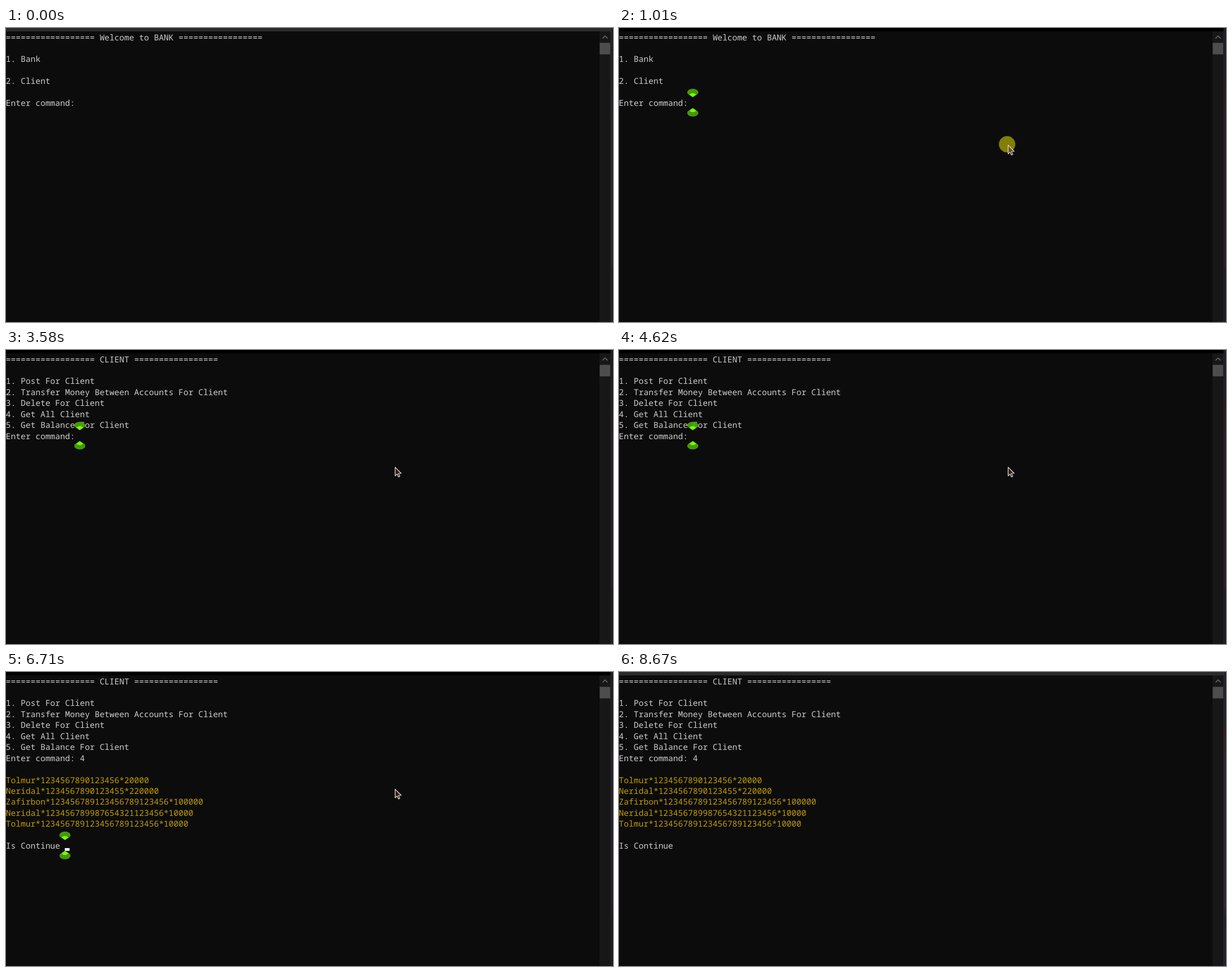
An HTML page for the animation above (8880 ms loop, 1074 by 521 pixels).

```html
<!DOCTYPE html>
<html lang="en">
<head>
<meta charset="utf-8">
<title>Console menu</title>
<style>
  html, body { margin: 0; width: 100%; height: 100%; overflow: hidden; background: #0c0c0c; }
  svg { display: block; width: 1074px; height: 521px; }
  text {
    font: 14.56px "Noto Sans Mono", "DejaVu Sans Mono", monospace;
    fill: #cccccc;
    white-space: pre;
    text-rendering: geometricPrecision;
  }
  text.gold { fill: #c19c00; }
</style>
</head>
<body>
<svg viewBox="0 0 1074 521">
  <defs>
    <linearGradient id="edge" x1="0" y1="0" x2="0" y2="1">
      <stop offset="0" stop-color="#1d1d26"/>
      <stop offset=".17" stop-color="#1d1d26"/>
      <stop offset=".2" stop-color="#2b191c"/>
      <stop offset=".3" stop-color="#301c2f"/>
      <stop offset=".8" stop-color="#301c2f"/>
      <stop offset=".83" stop-color="#1c1a25"/>
      <stop offset="1" stop-color="#21192a"/>
    </linearGradient>
    <g id="fan">
      <path fill="#4ca50a" opacity=".92" d="M0 0L-8.3-5.3Q-9.8-6.5-9.8-8.4C-9.6-12.5-5-14.8 0-14.8S9.6-12.5 9.8-8.4Q9.8-6.5 8.3-5.3Z"/>
      <path fill="#76f90a" d="M0 0L-6.3-4.5Q0-10 6.3-4.5Z"/>
    </g>
  </defs>

  <rect width="1074" height="521" fill="#0c0c0c"/>
  <rect x="1050" y="6" width="20" height="515" fill="#171717"/>
  <rect x="1050.5" y="26.3" width="18.5" height="20.4" fill="#4d4d4d"/>
  <path d="M1055.5 18.5L1060 14L1064.5 18.5" fill="none" stroke="#6c6c6c" stroke-width="1.5"/>
  <g id="side">
    <rect x="1071" width="3" height="521" fill="url(#edge)"/>
    <rect x="1070" width="1" height="521" fill="#38383c"/>
  </g>
  <rect id="bar" width="1070" height="6"/>

  <g id="lines"></g>
  <rect id="caret" width="8.5" height="5" fill="#f2f2f2"/>
  <g id="marks">
    <use href="#fan"/>
    <use href="#fan" transform="translate(0 19.4) scale(1 -1)"/>
  </g>
  <circle id="halo" cx="686.7" cy="206" r="14.5" fill="#807f06"/>
  <path id="pointer" d="M.5.6V16L4 12.8L6.4 18.1L8.8 17.1L6.5 11.8L11.2 11.5Z"
        fill="#5a3426" fill-opacity=".55" stroke="#f0e8e2" stroke-width="1.1" stroke-linejoin="round"/>
</svg>

<script>
const LOOP = 8880, CELL = 8.736, ROW = 19.45, LEFT = -0.2, TOP = 5.9, BASE = 15.6;
const $ = id => document.getElementById(id);
const colX = c => LEFT + c * CELL;
const rowY = r => TOP + r * ROW;
const head = s => `${"=".repeat(18)} ${s} ${"=".repeat(17)}`;

const menu = [head("Welcome to BANK"), "", "1. Bank", "", "2. Client", "", "Enter command: "];
const client = [
  head("CLIENT"), "",
  "1. Post For Client",
  "2. Transfer Money Between Accounts For Client",
  "3. Delete For Client",
  "4. Get All Client",
  "5. Get Balance For Client",
  "Enter command: "
];
const accounts = [
  "Tolmur*1234567890123456*20000",
  "Neridal*1234567890123455*220000",
  "Zafirbon*123456789123456789123456*100000",
  "Neridal*123456789987654321123456*10000",
  "Tolmur*123456789123456789123456*10000"
];
const type = (lines, key) => [...lines.slice(0, -1), lines[lines.length - 1] + key];
const clientDone = type(client, "4");

// Each track is a list of [start ms, value].
const screens = [
  [0, menu], [2050, type(menu, "2")], [2780, []], [2820, client],
  [5840, clientDone], [6690, [...clientDone, "", ...accounts, "", "Is Continue "]]
];
const carets = [
  [0, null], [1530, [15, 6]], [2050, null], [2560, [16, 6]], [2760, [0, 7]],
  [2820, [15, 7]], [3580, null], [4100, [15, 7]], [4620, null], [5140, [15, 7]],
  [5660, null], [6170, [16, 7]], [6690, [12, 15]], [7750, null],
  [8270, [12, 15]], [8670, null]
];
const markers = [
  [0, null], [1010, [15, 6]], [2050, [16, 6]], [2850, [15, 7]],
  [5860, [16, 7]], [6710, [12, 15]], [8670, null]
];
const at = (track, t) => track.filter(s => s[0] <= t).pop()[1];

function pointerAt(t) {
  if (t < 370 || t >= 7810) return null;
  if (t < 7690) {
    const rest = 1 - Math.min(20, Math.floor((t - 370) / 20)) / 20;
    return [688 + 302 * rest ** 2.83, 207 + 308 * rest ** 2.26];
  }
  const go = ((Math.floor((t - 7690) / 20) + 1) / 6) ** 1.7;
  return [688 + 342 * go, 207 + 282 * go];
}

function place(node, pos) {
  node.style.display = pos ? "" : "none";
  if (pos) node.setAttribute("transform", `translate(${pos[0]} ${pos[1]})`);
}

let shown;
function write(lines) {
  if (lines === shown) return;
  shown = lines;
  $("lines").replaceChildren(...lines.map((line, i) => {
    const node = document.createElementNS("http://www.w3.org/2000/svg", "text");
    node.setAttribute("x", LEFT);
    node.setAttribute("y", rowY(i) + BASE);
    if (line.includes("*")) node.setAttribute("class", "gold");
    node.textContent = line;
    return node;
  }));
}

function render(t) {
  const active = t >= 1010 && t < 8670;
  const caret = at(carets, t), mark = at(markers, t);
  write(at(screens, t));
  place($("caret"), caret && [Math.floor(colX(caret[0])), Math.floor(rowY(caret[1] + 1)) - 5]);
  place($("marks"), mark && [colX(mark[0]) - 0.3, rowY(mark[1])]);
  const tip = pointerAt(t);
  place($("pointer"), tip && tip.map(Math.round));
  $("halo").style.display = t >= 1010 && t < 1220 ? "" : "none";
  $("bar").setAttribute("fill", active ? "#000000" : "#2b2b2b");
  $("side").setAttribute("opacity", active ? 0.8 : 1);
}

let start;
function tick(now) {
  start ??= now;
  render((now - start) % LOOP);
  requestAnimationFrame(tick);
}
render(0);
requestAnimationFrame(tick);
</script>
</body>
</html>
```
